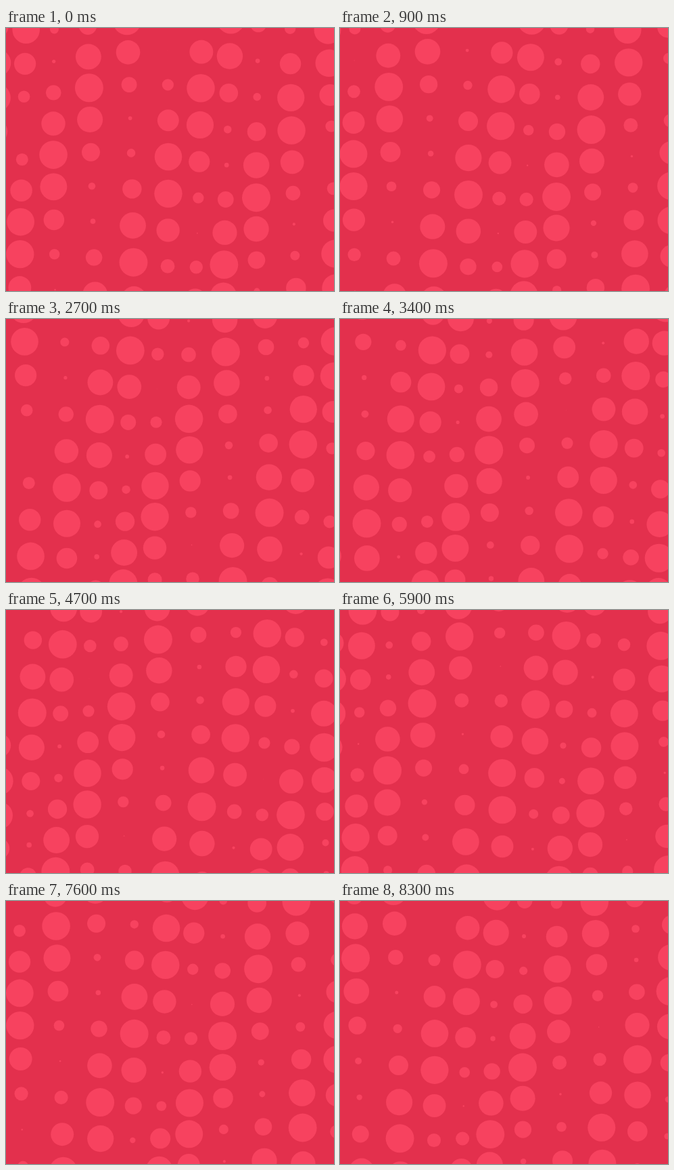
An HTML page with a canvas for the animation above (8400 ms loop, 485x388 px).

```html
<!DOCTYPE html>
<html lang="en">
<head>
<meta charset="utf-8">
<title>Wavy dots</title>
<style>
  html, body { margin: 0; width: 100%; height: 100%; overflow: hidden; background: #e3304d; }
  canvas { display: block; }
</style>
</head>
<body>
<canvas id="stage" width="485" height="388"></canvas>
<script>
const ctx = document.getElementById('stage').getContext('2d');
const LOOP = 8400, STEP = 100;
const SPACING = 50, SWAY = 10, MAX_RADIUS = 21;

function draw(t) {
  ctx.fillStyle = '#e3304d';
  ctx.fillRect(0, 0, 485, 388);
  ctx.fillStyle = '#f7425f';
  for (let col = -1; col <= 10; col++) {
    for (let row = -2; row <= 8; row++) {
      // Each dot sways on both axes and pulses, all at one radian per second.
      const x = 30 + SPACING * col + SWAY * Math.sin(col + 0.16 * row + t - 2.95);
      const y = 43 + SPACING * row + SWAY * Math.sin(0.735 * col + 0.437 * row + t + 1.73);
      const radius = MAX_RADIUS * Math.abs(Math.sin(col + 0.44 * row + t - 0.875));
      ctx.beginPath();
      ctx.arc(x, y, radius, 0, 2 * Math.PI);
      ctx.fill();
    }
  }
}

const start = performance.now();
function tick() {
  const elapsed = (performance.now() - start) % LOOP;
  draw(Math.floor(elapsed / STEP) * STEP / 1000);
  requestAnimationFrame(tick);
}
tick();
</script>
</body>
</html>
```
